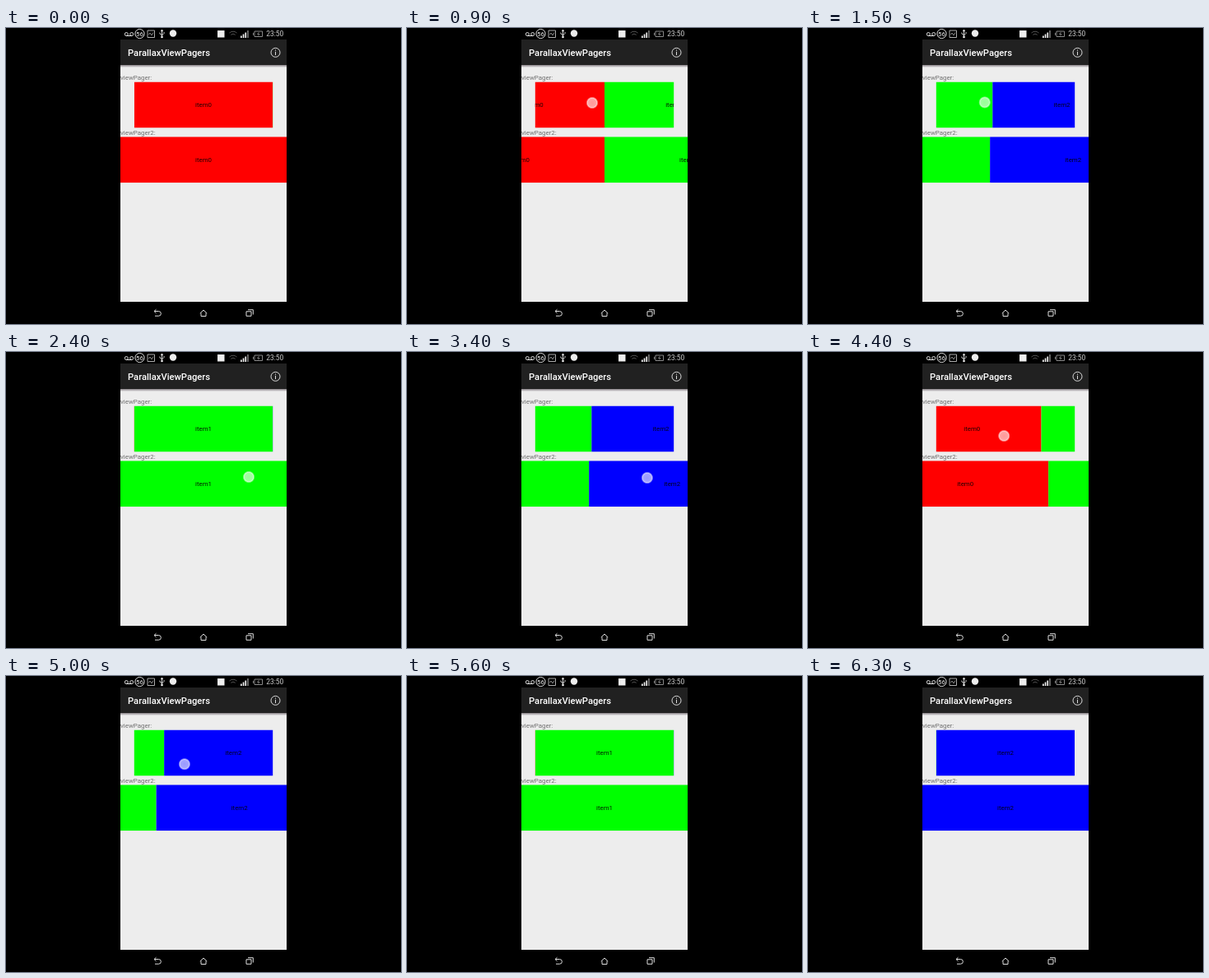
Animation, 480 px wide and 360 px high, one loop 6700 ms. Source, as an HTML page:

```html
<!DOCTYPE html>
<html lang="en">
<head>
<meta charset="utf-8">
<style>
  html, body { margin: 0; width: 100%; height: 100%; overflow: hidden; background: #000; }
  svg { display: block; }
  text { font-family: Roboto, "Open Sans", sans-serif; }
  .label { font-size: 7.86px; fill: #707070; }
  .item { font-size: 7.86px; fill: #000; fill-opacity: .87; text-anchor: middle; }
  .line { fill: none; stroke: #ddd; stroke-width: 1; }
</style>
</head>
<body>
<svg id="stage" width="480" height="360" viewBox="0 0 480 360">
  <defs>
    <radialGradient id="glow">
      <stop offset="0" stop-color="#fff" stop-opacity=".6"/>
      <stop offset=".62" stop-color="#fff" stop-opacity=".64"/>
      <stop offset=".76" stop-color="#fff" stop-opacity=".78"/>
      <stop offset="1" stop-color="#fff" stop-opacity="0"/>
    </radialGradient>
    <linearGradient id="shade" x2="0" y2="1">
      <stop offset="0" stop-color="#8d858b"/>
      <stop offset="1" stop-color="#ededed"/>
    </linearGradient>
  </defs>
  <rect width="480" height="360"/>
  <rect x="139" y="14" width="202" height="319" fill="#ededed"/>
  <rect x="139" y="14" width="202" height="31.3" fill="#212121"/>
  <rect x="139" y="45.3" width="202" height="2.7" fill="url(#shade)"/>

  <!-- status bar -->
  <g class="line">
    <circle cx="146.3" cy="7.5" r="2"/><circle cx="152.7" cy="7.5" r="2"/><path d="M146 9.5h7"/>
    <circle cx="162.5" cy="7" r="5.6"/>
    <path d="M172 3h8.500v8.500h-8.500z" stroke="#aaa"/><path d="M173.500 8l1.500-2 2 3 2-3.500" stroke="#aaa" stroke-width=".8"/>
    <path d="M189.500 3v8M187 5.500v1.500l2.500 2 2.500-2.500v-1.500"/>
    <path d="M271.500 6a6.500 6.500 0 0 1 9 0M273.300 8.300a4 4 0 0 1 5.400 0" stroke="#555"/>
    <path d="M302 4h9.500v6.500h-9.500zM300.500 5.800v3" stroke="#888"/>
    <path d="M307.500 5l-2 2.500h2.500l-1.500 2" stroke="#aaa" stroke-width=".7"/>
  </g>
  <g fill="#eee">
    <path d="M187.800 4l1.700-2.500 1.700 2.500z"/><circle cx="189.500" cy="11" r="1.300"/>
    <circle cx="203" cy="6.500" r="4.200"/>
    <rect x="257" y="3" width="8.500" height="8.500"/>
    <path d="M285 9.500h1.700v2.500h-1.700zM287.700 7.500h1.700v4.500h-1.700zM290.400 5.500h1.700v6.500h-1.700z"/>
    <path d="M293.100 3h1.700v9h-1.700z" fill="#777"/>
    <text x="162.500" y="9.800" font-size="7.800" text-anchor="middle">56</text>
    <text x="316.300" y="10.200" font-size="8.400" fill="#d0d0d0">23:50</text>
  </g>

  <!-- action bar -->
  <text x="148" y="34" font-size="11.2" font-weight="500" fill="#fff">ParallaxViewPagers</text>
  <circle cx="327.500" cy="29.800" r="5.500" class="line" stroke-width=".9"/>
  <path d="M327.500 26.500v1.200M327.500 28.800v4.200" class="line"/>

  <text class="label" x="139" y="63">viewPager:</text>
  <text class="label" x="139" y="130">viewPager2:</text>
  <g id="pagers"></g>
  <circle id="touch" r="7.5" fill="url(#glow)"/>

  <!-- navigation bar -->
  <g class="line" stroke-width="1.200">
    <path d="M182.500 342.200l-2.500 2.300 2.500 2.300M180.200 344.500h5.300a2.800 2.800 0 0 1 0 5.700h-4.500"/>
    <path d="M235.800 347l4.200-4 4.200 4M237 346.500v4h6v-4"/>
    <path d="M292 344.800h6v5.500h-6zM294 342.700h6.300v5.800"/>
  </g>
</svg>
<script>
const NS = 'http://www.w3.org/2000/svg';
const LOOP = 6700, STEP = 100, SWIPE = 400, PRESS = 160, RELEASE = .73;
const COLORS = ['#f00', '#0f0', '#00f'];

// Finger travel from (x0, y0) to (x1, y1) turns the page by dir.
const swipes = [
  { start: 700,  dir: 1,  x0: 300, x1: 150, y0: 92,  y1: 90 },
  { start: 1275, dir: 1,  x0: 315, x1: 146, y0: 91,  y1: 90 },
  { start: 1900, dir: -1, x0: 185, x1: 330, y0: 96,  y1: 94 },
  { start: 2550, dir: 1,  x0: 295, x1: 150, y0: 152, y1: 154 },
  { start: 3225, dir: -1, x0: 250, x1: 353, y0: 153, y1: 153 },
  { start: 3740, dir: -1, x0: 200, x1: 330, y0: 153, y1: 152 },
  { start: 4272, dir: 1,  x0: 279, x1: 110, y0: 102, y1: 102 },
  { start: 4720, dir: 1,  x0: 300, x1: 194, y0: 106, y1: 107.5 },
  { start: 5200, dir: -1, x0: 190, x1: 325, y0: 105, y1: 103 },
  { start: 5900, dir: 1,  x0: 300, x1: 150, y0: 104, y1: 105 }
];

function add(parent, tag, attrs, content = '') {
  const node = document.createElementNS(NS, tag);
  for (const key in attrs) node.setAttribute(key, attrs[key]);
  node.textContent = content;
  return parent.appendChild(node);
}

function makePager(x, y, width, height) {
  const view = add(document.getElementById('pagers'), 'svg', { x, y, width, height, overflow: 'hidden' });
  const strip = add(view, 'g', {});
  COLORS.forEach((fill, i) => {
    add(strip, 'rect', { x: i * width, width, height, fill });
    add(strip, 'text', { class: 'item', x: (i + .5) * width, y: height / 2 + 2.9 }, 'item' + i);
  });
  return { strip, width };
}

const pagers = [makePager(155.8, 65.5, 168.4, 56), makePager(139, 132.3, 202, 56)];
const touch = document.getElementById('touch');
const clamp = v => Math.min(1, Math.max(0, v));
const smooth = u => u * u * (3 - 2 * u);
const mix = (a, b, k) => a + (b - a) * k;

function render(ms) {
  const t = Math.floor((ms % LOOP) / STEP) * STEP;
  let page = 0, finger = null;
  for (const s of swipes) {
    const u = (t - s.start) / SWIPE, k = smooth(clamp(u));
    page += s.dir * k;
    if (t >= s.start - PRESS && u < RELEASE) finger = [mix(s.x0, s.x1, k), mix(s.y0, s.y1, k)];
  }
  for (const { strip, width } of pagers) strip.setAttribute('transform', `translate(${-page * width} 0)`);
  touch.setAttribute('visibility', finger ? 'visible' : 'hidden');
  if (finger) {
    touch.setAttribute('cx', finger[0]);
    touch.setAttribute('cy', finger[1]);
  }
}

const began = performance.now();
function tick() {
  render(performance.now() - began);
  requestAnimationFrame(tick);
}
tick();
</script>
</body>
</html>
```
